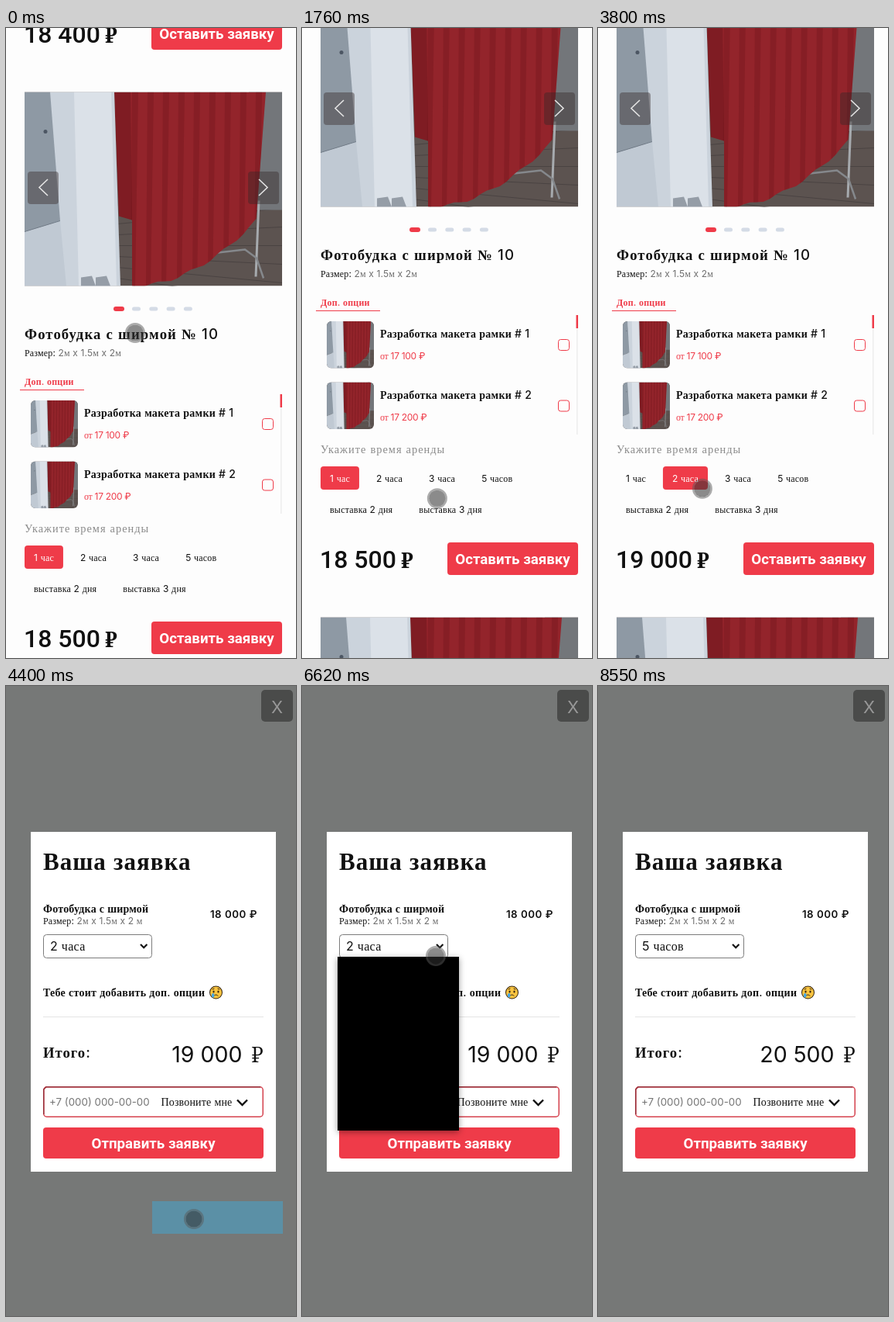
Animation of 375x812 px, one loop 9040 ms. Source, as an HTML page with a canvas:

```html
<!DOCTYPE html>
<html lang="ru">
<head>
<meta charset="utf-8">
<style>
html, body { margin: 0; width: 100%; height: 100%; overflow: hidden; background: #fdfdfd; }
canvas { display: block; }
</style>
</head>
<body>
<canvas id="stage" width="375" height="812"></canvas>
<script>
const ctx = document.getElementById('stage').getContext('2d');
const LOOP = 9040, CARD = 779;
const RED = '#ef3b49', INK = '#111', GREY = '#6d6d6d';
const SERIF = '"Liberation Serif", serif', SANS = 'Inter, sans-serif', UI = 'Roboto, sans-serif';
const RUBLE = '"Noto Serif", serif';

const HOME = [167, 393];
// Cursor glides; via bends the way
const GLIDES = [
  { from: 1250, till: 1820, to: [177, 613], via: [140, 500] },
  { from: 2010, till: 2060, to: [177, 622] },
  { from: 2640, till: 3250, to: [112, 574], via: [68, 614] },
  { from: 3660, till: 4190, to: [243, 687] },
  { from: 4530, till: 5100, to: [215, 430] },
  { from: 5100, till: 5720, to: [47, 422] },
  { from: 5720, till: 5930, to: [328, 412] },
  { from: 5930, till: 6140, to: [184, 344] },
  { from: 6270, till: 6620, to: [173, 348], via: [220, 334] },
  { from: 6620, till: 7130, to: [99, 484] },
  { from: 7920, till: 8550, to: [392, 830], via: [300, 560] }
];

const smooth = u => u * u * (3 - 2 * u);

function cursorAt(t) {
  let at = HOME;
  for (const { from, till, to, via } of GLIDES) {
    if (t < from) break;
    const s = smooth(Math.min(1, (t - from) / (till - from))), r = 1 - s;
    const start = at;
    at = to.map((end, k) => {
      const mid = via ? via[k] : (start[k] + end) / 2;
      return r * r * start[k] + 2 * r * s * mid + s * s * end;
    });
  }
  return at;
}

function box(x, y, w, h, r, fill) {
  ctx.beginPath();
  ctx.roundRect(x, y, w, h, r);
  ctx.fillStyle = fill;
  ctx.fill();
}

function frame(x, y, w, h, r, color, width = 1) {
  ctx.beginPath();
  ctx.roundRect(x, y, w, h, r);
  ctx.strokeStyle = color;
  ctx.lineWidth = width;
  ctx.stroke();
}

function trace(p) {
  ctx.beginPath();
  for (let i = 0; i < p.length; i += 2) ctx.lineTo(p[i], p[i + 1]);
}

function poly(fill, ...p) {
  trace(p);
  ctx.fillStyle = fill;
  ctx.fill();
}

function line(color, width, ...p) {
  trace(p);
  ctx.strokeStyle = color;
  ctx.lineWidth = width;
  ctx.stroke();
}

function disc(x, y, r, fill) {
  ctx.beginPath();
  ctx.arc(x, y, r, 0, 7);
  ctx.fillStyle = fill;
  ctx.fill();
}

function arrowDown(x, y, r, width) {
  line(INK, width, x - r, y, x, y + r, x + r, y);
}

function text(str, x, y, font, color, align = 'left', spacing = 0) {
  ctx.font = font;
  ctx.letterSpacing = spacing + 'px';
  ctx.textAlign = align;
  ctx.fillStyle = color;
  ctx.fillText(str, x, y);
  return x + ctx.measureText(str).width;
}

// Cyrillic falls back to a serif, everything else is sans
function mixed(str, x, y, size, weight, color, spacing = 0) {
  for (const part of str.match(/[А-яЁё№]+|[^А-яЁё№]+/g)) {
    const serif = /[А-яЁё№]/.test(part);
    const w = weight === 'bold' && !serif ? 500 : weight;
    x = text(part, x, y, `${w} ${size}px ${serif ? SERIF : SANS}`, color, 'left', spacing);
  }
  return x;
}

function action(label, x, y, w, h) {
  box(x, y, w, h, 4, RED);
  text(label, x + w / 2, y + h / 2 + 6.5, `bold 18.72px ${UI}`, '#fff', 'center');
}

function booth(x, y, size) {
  mixed(size, mixed('Размер: ', x, y, 12, 400, INK, 0.15), y, 12, 400, GREY, 0.15);
}

function curtain() {
  const left = 139, span = 169;
  ctx.beginPath();
  ctx.moveTo(312, 0);
  ctx.lineTo(116, 0);
  ctx.lineTo(122, 160);
  ctx.lineTo(left, 165);
  for (let u = 0; u <= 1; u += 0.05) {
    ctx.lineTo(left + span * u, 250 - 94 * u * u + 2 * Math.sin(u * 25));
  }
  ctx.save();
  ctx.clip();
  box(110, 0, 210, 250, 0, '#93242b');
  for (let i = 0; i < 9; i++) {
    const x = left + i * 20;
    poly('rgba(110,20,28,.35)', x, 0, x + 8, 0, x + 4, 250, x - 2, 250);
  }
  poly('rgba(90,15,22,.35)', 116, 0, 137, 0, left, 170, 122, 170);
  ctx.restore();
}

// Photo in a 333 x 250 space
function photo() {
  box(0, 0, 333, 250, 0, '#5c5350');
  for (let i = 0; i < 7; i++) line('#4a4342', 1, 120, 170 + i * 14, 333, 150 + i * 24);
  box(290, 0, 43, 152, 0, '#73767a');
  line('#a6aaae', 3, 303, 140, 299, 238);
  line('#85888c', 2.5, 250, 207, 285, 203, 300, 214, 309, 240);
  curtain();
  poly('#cbd3dc', 32, 0, 116, 0, 124, 250, 40, 250);
  poly('#dbe1e8', 64, 0, 112, 0, 119, 250, 70, 250);
  poly('#8e99a4', 0, 0, 33, 0, 46, 166, 0, 180);
  poly('#c0c9d3', 0, 180, 46, 166, 54, 250, 0, 250);
  line('#717c88', 1, 0, 180, 46, 166);
  disc(27, 51, 2.5, '#4c5663');
  for (const x of [73, 92]) poly('#959da7', x, 239, x + 14, 237, x + 19, 250, x, 250);
}

function picture(x, y, w, h, r) {
  ctx.save();
  ctx.beginPath();
  ctx.roundRect(x, y, w, h, r);
  ctx.clip();
  ctx.translate(x, y);
  ctx.scale(w / 333, h / 250);
  photo();
  ctx.restore();
}

function option(n, y) {
  picture(32, y, 61, 60.5, 6);
  mixed('Разработка макета рамки # ' + n, 101, y + 21, 14, 'bold', INK, 0.28);
  mixed(`от 17 ${n}00 ₽`, 101, y + 49, 12, 400, RED, -0.3);
  frame(331.5, y + 23.5, 14, 14, 3, RED);
}

// Rent buttons flow in rows and wrap at the right margin
function rentTimes(picked) {
  const labels = ['1 час', '2 часа', '3 часа', '5 часов', 'выставка 2 дня', 'выставка 3 дня'];
  let x = 24, y = 667;
  labels.forEach((label, i) => {
    const put = color => mixed(label, x + 12, y + 20, 12, 400, color, 0.2);
    let right = put('transparent') + 12;
    if (right > 357) {
      right += 24 - x;
      x = 24;
      y += 40;
    }
    if (i === picked) box(x, y, right - x, 30, 4, RED);
    put(i === picked ? '#fff' : INK);
    x = right + 10;
  });
}

function card(price, picked) {
  picture(24, 82.5, 333, 250, 0);
  for (const [x, d] of [[28, -1], [313, 1]]) {
    box(x, 185, 40, 42, 4, 'rgba(50,40,40,.42)');
    const m = x + 20;
    line('#e4e4e4', 1.6, m - 6 * d, 195, m + 5 * d, 205.5, m - 6 * d, 216);
  }
  box(139, 359, 14, 6, 3, RED);
  for (let i = 0; i < 4; i++) box(163 + i * 22.3, 359.5, 11, 5, 2.5, '#d4dbe6');
  mixed('Фотобудка с ширмой № 10', 24, 401, 18.72, 'bold', INK, 1.1);
  booth(24, 423, '2м x 1.5м x 2м');
  mixed('Доп. опции', 24, 460, 12, 'bold', RED, 0.2);
  box(18, 466, 83, 1, 0, RED);
  option(1, 480);
  option(2, 558.5);
  box(355, 472, 1.5, 154, 0, '#eeeeee');
  box(354.5, 472, 2.5, 17, 0, RED);
  mixed('Укажите время аренды', 24, 650, 14.4, 400, '#8b8b8b', 1);
  rentTimes(picked);
  const end = text(price, 23, 798, `500 32px ${UI}`, INK);
  text('₽', end + 6, 798, `bold 27px ${RUBLE}`, INK);
  action('Оставить заявку', 188, 765, 169, 42);
}

function page(t) {
  const u = t < 860 ? 0 : Math.min(1, (t - 830) / 200);
  const scroll = 102 * (1 - (1 - u) ** 1.6);
  let price = '18 500', picked = 0;
  if (t >= 2290) [price, picked] = ['54 000', 5];
  if (t >= 3550) [price, picked] = ['19 000', 1];
  box(0, 0, 375, 812, 0, '#fdfdfd');
  for (let i = -1; i < 2; i++) {
    ctx.save();
    ctx.translate(0, i * CARD - scroll);
    card(i < 0 ? '18 400' : i ? '18 600' : price, i ? 0 : picked);
    ctx.restore();
  }
  if (t >= 860 && t < 1030) box(373.5, 335, 1.5, 34, 0, '#d9d9d9');
}

function sadFace(x, y) {
  const dark = '#33230e';
  disc(x, y, 8.5, dark);
  disc(x, y, 7.5, '#f9c440');
  for (const d of [-3, 3]) {
    box(x + d - 1, y - 2.5, 2, 3, 1, dark);
    line(dark, 1, x + d * 0.7, y - 5, x + d * 1.6, y - 4);
  }
  ctx.beginPath();
  ctx.arc(x, y + 6, 3, 3.6, 5.8);
  ctx.stroke();
  box(x - 5.5, y + 1, 3.4, 5.5, 1.7, '#45a8e8');
}

function modal(t) {
  box(0, 0, 375, 812, 0, '#767877');
  box(330, 5, 41, 41, 5, '#4a4b4a');
  text('X', 350.5, 35, `400 22px ${SANS}`, '#989898', 'center');
  if (t < 4530) box(189, 664, 169, 42, 0, '#5b90a6');

  box(32, 188, 317, 438, 0, '#fff');
  mixed('Ваша заявка', 48, 237, 31, 'bold', INK, 1);
  mixed('Фотобудка с ширмой', 48, 292, 14, 'bold', INK, 0.2);
  booth(48, 307, '2м x 1.5м x 2 м');
  text('18 000 ₽', 264, 299, `600 13.3px ${SANS}`, INK, 'left', 0.5);
  frame(48.5, 320.5, 140, 30, 4, '#7c7c7c');
  mixed(t < 7230 ? '2 часа' : '5 часов', 57, 341, 16, 400, INK, 0.3);
  arrowDown(178.2, 333, 4.2, 2.2);

  mixed('Тебе стоит добавить доп. опции', 48, 400, 14, 'bold', INK, 0.26);
  sadFace(271.5, 395);
  box(48, 426, 285, 1, 0, '#e4e4e4');
  mixed('Итого:', 48, 479, 18.72, 'bold', INK, 1);
  text(t < 7300 ? '19 000' : '20 500', 305.5, 485, `400 28.5px ${SANS}`, INK, 'right');
  text('₽', 333, 485, `400 27px ${RUBLE}`, INK, 'right');

  frame(48.75, 516.75, 283.5, 38.5, 4, '#d5424e', 1.5);
  line('#98303a', 1.5, 48.75, 552, 48.75, 520, 52, 516.75, 329, 516.75);
  text('+7 (000) 000-00-00', 56, 541, `400 13.33px ${SANS}`, '#757575');
  mixed('Позвоните мне', 200.5, 541, 14, 400, INK, 0.15);
  arrowDown(305.5, 533.5, 6.5, 2.4);
  action('Отправить заявку', 48, 569, 285, 40);

  if (t >= 6270 && t < 7230) {
    ctx.save();
    ctx.shadowColor = 'rgba(0,0,0,.4)';
    ctx.shadowBlur = 8;
    ctx.shadowOffsetY = 2;
    box(46, 349, 157, 224, 0, '#000');
    ctx.restore();
  }
}

function pointer([x, y]) {
  disc(x, y, 10.5, 'rgba(50,50,50,.56)');
  ctx.beginPath();
  ctx.arc(x, y, 11.7, 0, 7);
  ctx.strokeStyle = 'rgba(90,90,90,.5)';
  ctx.lineWidth = 2.6;
  ctx.stroke();
}

function draw() {
  const t = performance.now() % LOOP;
  if (t < 4400) page(t);
  else modal(t);
  pointer(cursorAt(t));
  requestAnimationFrame(draw);
}
draw();
</script>
</body>
</html>
```
